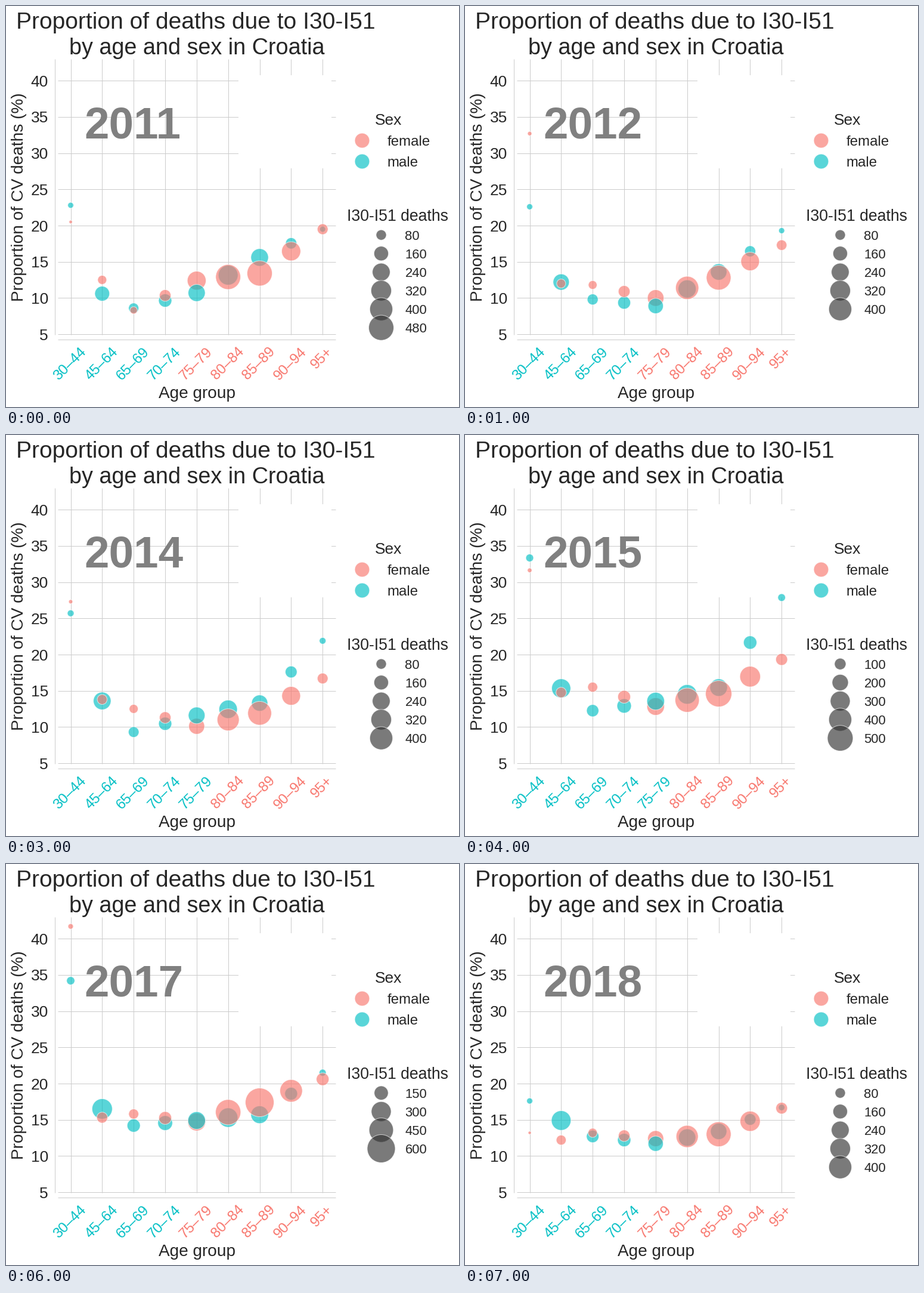
A matplotlib script for the animation above (8 s loop, 760 by 672 pixels).

```python
import numpy as np
import matplotlib.pyplot as plt
from matplotlib.animation import FuncAnimation
from matplotlib.patches import Circle, Rectangle

W, H, DPI = 760, 672, 80
PT = 72 / DPI  # points per pixel
INK, GRID = "#262626", "#cccccc"
FEMALE, MALE = "#F8766D", "#00BFC4"
ALPHA = 0.65
AREA = 0.92  # squared radius in pixels per death
AGES = ["30–44", "45–64", "65–69", "70–74", "75–79",
        "80–84", "85–89", "90–94", "95+"]
YEARS = range(2011, 2019)

# Share curves bend at these age groups: female, then male, in per cent.
GROUP = np.arange(len(AGES))
KNOTS = [0, 1, 2, 4, 6, 8]
CURVES = {
    2011: ([20.5, 12.5, 8.3, 12.4, 13.4, 19.5],
           [22.8, 10.6, 8.6, 10.7, 15.6, 19.5]),
    2012: ([32.7, 12.0, 11.8, 10.0, 12.8, 17.3],
           [22.6, 12.2, 9.8, 8.9, 13.6, 19.3]),
    2014: ([27.3, 13.8, 12.5, 10.1, 11.9, 16.7],
           [25.7, 13.6, 9.3, 11.6, 13.3, 21.9]),
    2016: ([28.2, 12.1, 14.7, 12.4, 13.7, 17.2],
           [32.8, 13.3, 12.2, 12.2, 13.8, 27.0]),
    2017: ([41.7, 15.3, 15.8, 14.7, 17.4, 20.6],
           [34.2, 16.5, 14.2, 14.9, 15.7, 21.5]),
    2018: ([13.2, 12.2, 13.2, 12.4, 13.0, 16.6],
           [17.6, 14.9, 12.7, 11.7, 13.4, 16.7]),
}
# Years without curves: neighbours' mean times a factor.
BETWEEN = {2013: 0.8, 2015: 1.14}

# All cardiovascular deaths in 2014, and their yearly growth by age group.
TOTAL = np.array([[46, 540, 480, 900, 1900, 3350, 3600, 1850, 520],
                  [130, 1740, 920, 1250, 1820, 2050, 1500, 600, 150]])
GROWTH = 0.045 * np.sin((GROUP - 6) * np.pi / 4)

plt.rcParams["font.family"] = "Liberation Sans"
fig = plt.figure(figsize=(W / DPI, H / DPI), dpi=DPI, facecolor="white")
ax = fig.add_axes([0, 0, 1, 1])
ax.set(xlim=(0, W), ylim=(H, 0))
ax.axis("off")


def x_at(i):
    return 108.5 + 52.84 * i


def y_at(share):
    return 550 - 12.137 * (share - 5)


def label(x, y, s, size, color=INK, ha="left", va="baseline", **kw):
    return ax.text(x, y, s, fontsize=size * PT, color=color,
                   ha=ha, va=va, **kw)


def line(x0, y0, x1, y1):
    ax.plot([x0, x1], [y0, y1], color=GRID, lw=PT, zorder=1,
            solid_capstyle="butt")


def bubble(x, y, r, color, z=4):
    return ax.add_patch(Circle((x, y), r, fc=color, ec="white", lw=PT,
                               alpha=ALPHA, zorder=z))


def shares(year):
    if year in CURVES:
        return np.array([np.interp(GROUP, KNOTS, c) for c in CURVES[year]])
    return (shares(year - 1) + shares(year + 1)) / 2 * BETWEEN[year]


def legend_sizes(most):
    step = next(s for s in (60, 80, 100, 150) if most < 6.2 * s)
    return range(step, int(most) + 1, step)


def draw_static():
    label(318.5, 38, "Proportion of deaths due to I30-I51", 39, ha="center")
    label(320, 81, "by age and sex in Croatia", 37.7, ha="center")
    for share in range(5, 45, 5):
        y = y_at(share)
        line(87, y, 552.5, y)
        label(71, y + 9.6, str(share), 26.4, ha="right")
    for i in GROUP:
        line(x_at(i), 89, x_at(i), 551)
    line(81.5, 89, 81.5, 551)
    line(87, 558.5, 552.5, 558.5)
    ax.add_patch(Rectangle((390, 116), 156, 156, fc="white", zorder=2))
    label(29.5, 320, "Proportion of CV deaths (%)", 28, ha="center",
          rotation=90, rotation_mode="anchor")
    label(320, 657, "Age group", 28, ha="center")

    label(642, 199, "Sex", 26.4, ha="center")
    for y, name, color in [(225.5, "female", FEMALE), (260.5, "male", MALE)]:
        bubble(597.5, y, 12.4, color)
        label(639.5, y + 8.7, name, 24)
    label(656.5, 360, "I30-I51 deaths", 26.6, ha="center")


draw_static()
shown = []


def draw(frame):
    while shown:
        shown.pop().remove()
    year = YEARS[frame]
    share = shares(year)
    deaths = share / 100 * TOTAL * (1 + GROWTH * (year - 2014))
    shown.append(label(131.5, 222, str(year), 74.6, "#808080", weight="bold"))

    for i, age in enumerate(AGES):
        x = x_at(i)
        top = 1 if age == "75–79" else 0  # men lie on top in this group only
        for sex in (0, 1):
            shown.append(bubble(x, y_at(share[sex, i]),
                                np.sqrt(AREA * deaths[sex, i]),
                                (FEMALE, MALE)[sex], 5 if sex == top else 4))
        color = MALE if deaths[1, i] > deaths[0, i] else FEMALE
        shown.append(label(x - 0.8, 568.2, age, 24, color, ha="center",
                           va="top", rotation=45))

    for k, n in enumerate(legend_sizes(deaths.max())):
        y = 383.7 + 31.1 * k
        shown.append(bubble(629.5, y, np.sqrt(AREA * n), "0.2"))
        shown.append(label(669.5, y + 8, str(n), 22))
    return shown


anim = FuncAnimation(fig, draw, frames=len(YEARS), interval=1000,
                     init_func=lambda: [], repeat=True, repeat_delay=0)
plt.show()
```
